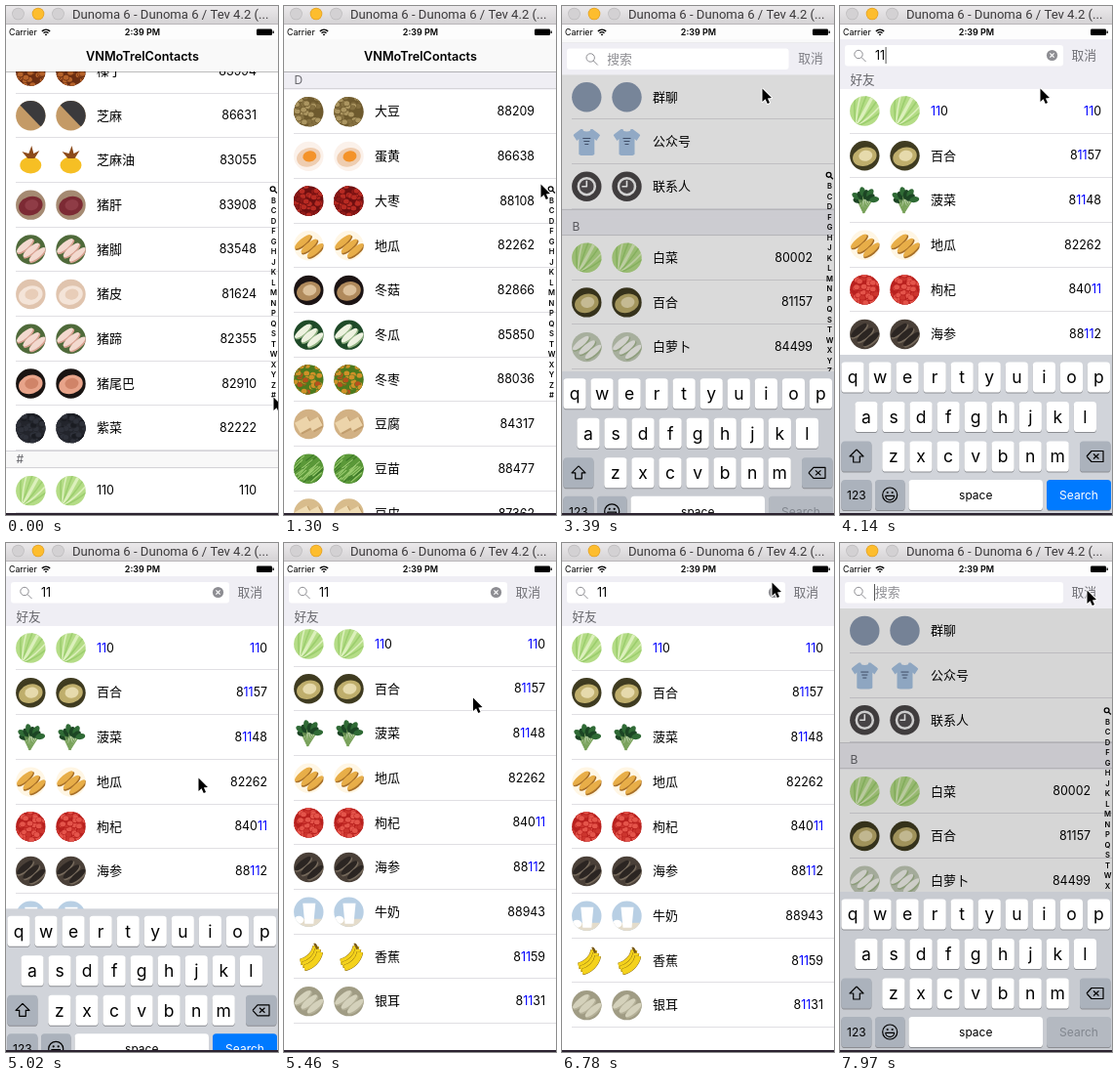
Animation of 279 by 521 pixels, one loop 8000 ms. Source, as an HTML page with a canvas:

```html
<!DOCTYPE html>
<html lang="zh">
<head>
<meta charset="utf-8">
<title>Contacts</title>
<style>
html, body { margin: 0; width: 100%; height: 100%; overflow: hidden; background: #fff; }
canvas { display: block; width: 279px; height: 521px; }
</style>
</head>
<body>
<canvas id="stage"></canvas>
<script>
const W = 279, H = 521, LOOP = 8000;
const ROW = 45.7, HEAD = 18.3, BAR = 33, TOP = 67, END = 519;
const FONT = 'Inter, "Noto Sans CJK SC", "Noto Sans CJK", sans-serif';
const TITLE = 'Roboto, sans-serif';
const GRAY = '#efeef4', LINE = '#e0dfe3';

const canvas = document.getElementById('stage');
const dpr = window.devicePixelRatio || 1;
canvas.width = Math.round(W * dpr);
canvas.height = Math.round(H * dpr);
const g = canvas.getContext('2d');
g.scale(dpr, dpr);

// name, number, picture kind, colours
const DATA = `
>
群聊 - o 8b9bb3
公众号 - t fff a9c6e6 4a5a78
联系人 - c 4b4749
>B
白菜 80002 v b4dc86 dcf0bc 9cce6e
百合 81157 e 3f3b20 bfae6c e6daac
白萝卜 84499 r c3ccb8 f4f4ee a5b890
扁豆 86588 g 55803f 8bb060 36565a
菠菜 81148 p fff 2f6a35 1c4524
菠萝 87968 a fff f0a020 3b7a2b
>C
草莓 85203 d b8202a e04848 7c1016
橙子 83746 e f4d9a0 f29a1e f8bf50
蚕豆 86920 d 6f9a3a a4c864 4d7426
>D
大豆 88209 d 6e5a2e ab9560 857040
蛋黄 86638 e fbf1ea efcdb0 f4932a
大枣 88108 d 6e0f10 b82a22 8c1816
地瓜 82262 r fff6e4 e8ae48 a87028
冬菇 82866 e 1c1414 b08a5c dcc09a
冬瓜 85850 r 1f4a28 eef2e0 8fb080
冬枣 88036 d 4d7a1e d09028 b8501c
豆腐 84317 k d2b184 ecd4aa c09c6c
豆苗 88477 g 5a9838 9ccc70 3d7a28
豆皮 87362 k d8bc8c efdcb4 c09c68
>G
枸杞 84011 d b8201e e4544a cc352e
桂圆 86054 d 9a7444 c8a06a 5e4424
>H
海参 88112 r 4a4038 2b2522 766a5c
核桃 87340 d a87c4c d0a878 6c4a28
花生 83629 d c89a60 e6c490 96683a
>L
莲藕 86275 e c8b49a f2e6d8 d6c0aa
辣椒 82037 r e8efe0 c8281c 3c7a2c
>N
牛奶 88943 m b8cfe4 fff e4dccb
南瓜 85366 e 8c4a10 ec8a20 f6b050
>T
土豆 84582 d c4a060 dcc088 987438
桃子 87204 e e8f0d8 f0989a f8c8b8
>X
香蕉 81159 b fff f4d21c 7a5a14
西瓜 83470 e 3a7a30 e8484c f07a78
>Y
银耳 81131 r a09c84 d4d1bb b4b098
玉米 86703 g 7aa040 f4cc3c c89820
>Z
榛子 83994 d 6b2e12 b5622a 8e4a1e
芝麻 86631 h c49a66 3b3a3c
芝麻油 83055 a fff f6bf24 8c4a1a
猪肝 83908 e a58a72 7c2a34 8f3c46
猪脚 83548 r 4f6a3a f3d9cf d8a090
猪皮 81624 e e0c4ae f4e4d8 e8cdb8
猪蹄 82355 r 4f6a3a f3d9cf d8a090
猪尾巴 82910 e 1a1412 e8a48a d08468
紫菜 82222 d 23252c 2e313a 1a1c22
>#
110 110 v b4dc86 dcf0bc 9cce6e`;

const blocks = [], items = [], sectionY = {};
let total = BAR;
for (const line of DATA.trim().split('\n')) {
  if (line[0] === '>') {
    const key = line.slice(1);
    if (!key) continue;
    if (key === 'B') { blocks.push({ y: total, h: 9, gap: true }); total += 9; }
    sectionY[key] = total;
    blocks.push({ y: total, h: HEAD, key });
    total += HEAD;
  } else {
    const [name, num, kind, ...cols] = line.split(' ');
    const item = { name, num: num === '-' ? '' : num, kind, cols: cols.map(c => '#' + c) };
    if (item.num) items.push(item);
    blocks.push({ y: total, h: ROW, item });
    total += ROW;
  }
}
items.unshift(items.pop());
const ALSO = ['地瓜', '牛奶'];   // found by other fields than the visible ones

// ---- helpers ----
const clamp = v => Math.max(0, Math.min(1, v));
const ease = v => { v = clamp(v); return v * v * (3 - 2 * v); };
const lerp = (a, b, p) => a + (b - a) * p;

function track(keys, t) {
  for (let i = 1; i < keys.length; i++) {
    const a = keys[i - 1], b = keys[i];
    if (t < b[0]) {
      const p = ease((t - a[0]) / (b[0] - a[0]));
      return a.slice(1).map((v, n) => lerp(v, b[n + 1], p));
    }
  }
  return keys[keys.length - 1].slice(1);
}
function rect(x, y, w, h, c) { g.fillStyle = c; g.fillRect(x, y, w, h); }
function round(x, y, w, h, r, c) {
  g.beginPath(); g.roundRect(x, y, w, h, r); g.fillStyle = c; g.fill();
}
function oval(x, y, rx, ry, a, c) {
  g.beginPath(); g.ellipse(x, y, rx, ry, a, 0, 7); g.fillStyle = c; g.fill();
}
const disc = (x, y, r, c) => oval(x, y, r, r, 0, c);
function poly(pts, c) {
  g.beginPath();
  pts.forEach(p => g.lineTo(p[0], p[1]));
  g.closePath();
  g.fillStyle = c; g.fill();
}
function stroke(c, w, pts) {
  g.strokeStyle = c; g.lineWidth = w;
  if (pts) { g.beginPath(); pts.forEach(p => g.lineTo(p[0], p[1])); }
  g.stroke();
}
function text(s, x, y, size, color = '#000', align = 'left', weight = 400, family = FONT) {
  g.font = `${weight} ${size}px ${family}`;
  g.textAlign = align;
  g.fillStyle = color;
  g.fillText(s, x, y + size * 0.36);
}
function marked(s, x, y, q, right) {
  const size = /\d/.test(s) ? 12.4 : 13;
  g.font = `400 ${size}px ${FONT}`;
  if (right) x -= g.measureText(s).width;
  const at = q ? s.indexOf(q) : -1;
  const parts = at < 0 ? [s] : [s.slice(0, at), q, s.slice(at + q.length)];
  parts.forEach((part, i) => {
    text(part, x, y, size, i === 1 ? '#00f' : '#000');
    x += g.measureText(part).width;
  });
}
function lens(x, y, r, c, w) {
  g.beginPath(); g.arc(x, y, r, 0, 7); stroke(c, w);
  stroke(c, w, [[x + r * .7, y + r * .7], [x + r * 1.8, y + r * 1.8]]);
}

// ---- row pictures ----
const art = {
  o() {},
  t(a, b, c) {
    poly([[-6, -13], [6, -13], [14, -7], [10, -1], [8, -3], [8, 14], [-8, 14], [-8, -3], [-10, -1], [-14, -7]], b);
    oval(0, -13, 4, 2.5, 0, '#fff');
    for (let i = 0; i < 3; i++) rect(-4 + i, -4 + i * 3, 8 - 2 * i, 1, c);
  },
  c() {
    g.beginPath(); g.arc(0, 0, 8.5, 0, 7);
    g.fillStyle = '#555153'; g.fill(); stroke('#f4f4f4', 2.5);
    stroke('#fff', 1.6, [[0, -6], [0, 0], [-5, 0]]);
  },
  d(a, b, c, rnd) {
    for (let i = 0; i < 48; i++) {
      const x = rnd() * 30 - 15, y = rnd() * 30 - 15;
      oval(x, y, 3.4, 3, 0, a);
      oval(x, y - .4, 2.9, 2.5, 0, i % 3 ? b : c);
    }
  },
  v(a, b, c) {
    g.rotate(.5);
    for (let i = -3; i <= 3; i++) {
      g.beginPath(); g.moveTo(0, 18); g.quadraticCurveTo(i * 4, 4, i * 6, -15);
      stroke(i % 2 ? c : b, i ? 1.6 : 3.2);
    }
  },
  g(a, b, c, rnd) {
    for (let i = 0; i < 30; i++) {
      const x = rnd() * 30 - 20, y = rnd() * 30 - 10;
      stroke(i % 2 ? b : c, 1.1, [[x, y], [x + 11, y - 7 - rnd() * 5]]);
    }
  },
  r(a, b, c) {
    g.rotate(-.7);
    for (let i = -1; i <= 1; i++) {
      oval(i * 2, i * 7.5 + 2, 11, 3.6, 0, c);
      oval(i * 2, i * 7.5 + .6, 10.5, 3.3, 0, b);
    }
  },
  k(a, b, c) {
    g.rotate(-.5);
    rect(-11, -7, 14, 13, c); rect(-12, -8, 14, 12, b);
    rect(1, -1, 12, 11, c); rect(0, -2, 12, 10, b);
  },
  m(a, b, c) {
    rect(-16, 7, 32, 10, c);
    poly([[-6, -9], [7, -9], [5, 12], [-4, 12]], b);
    oval(-10, 8, 5, 4, 0, b);
  },
  e(a, b, c) { oval(0, 1, 12.5, 9.5, -.3, b); oval(1, 0, 7, 5.5, -.2, c); },
  h(a, b) { poly([[-13, -13], [0, -18], [18, -18], [18, 11], [10, 11]], b); },
  a(a, b, c) {
    oval(0, 5, 11, 8.5, 0, b);
    poly([[-3, -2], [-9, -9], [-2, -7], [1, -15], [3, -7], [9, -10], [4, -2]], c);
  },
  p(a, b, c) {
    for (let i = 0; i < 8; i++) {
      const an = 3.3 + i * .4, far = i % 2 ? 10 : 7;
      stroke('#7aa35c', 1.4, [[-1, 13], [Math.cos(an) * 7, 2 + Math.sin(an) * 7]]);
      oval(Math.cos(an) * far, 1 + Math.sin(an) * far, 5, 3, an, i % 2 ? b : c);
    }
  },
  b(a, b, c) {
    for (let i = 0; i < 3; i++) {
      g.beginPath(); g.arc(-13 + i * 2, -15 + i * 3, 21, .2, 1.35);
      stroke(c, 6.6); stroke(b, 5.8);
    }
    stroke(c, 2.5, [[6, -14], [9, -8]]);
  }
};
function picture(item, x, y) {
  let seed = [...item.name].reduce((n, c) => n * 31 + c.charCodeAt(0), 7) % 2147483647;
  const rnd = () => (seed = seed * 16807 % 2147483647) / 2147483647;
  const [a, b, c] = item.cols;
  g.save();
  g.translate(x, y);
  g.beginPath(); g.arc(0, 0, 15.2, 0, 7);
  g.fillStyle = a; g.fill(); g.clip();
  art[item.kind](a, b, c, rnd);
  g.restore();
}
function row(item, y, right, q) {
  const cy = y + ROW / 2;
  picture(item, 25.3, cy);
  picture(item, 66.5, cy);
  marked(item.name, 93, cy - .4, q);
  marked(item.num, right, cy - .4, q, true);
  rect(10, Math.floor(y + ROW - .35), W - 10, 1, LINE);
}

// ---- screen parts ----
function list(top) {
  for (const b of blocks) {
    const y = top + b.y;
    if (y > H || y + b.h < 30) continue;
    if (b.item) row(b.item, y, 257, '');
    else {
      rect(0, y, W, b.h + .4, b.key === '#' ? '#f8f8f8' : GRAY);
      if (b.key) {
        text(b.key, 10.5, y + 8.7, 12, '#66666b');
        rect(0, Math.round(y + b.h) - 1, W, 1, '#d4d3d8');
      }
      if (b.gap || b.key === '#') rect(0, Math.round(y), W, 1, '#d4d3d8');
    }
  }
}
function indexBar(y) {
  lens(273.6, y - .8, 2.4, '#000', 1.3);
  [...'BCDFGHJKLMNPQSTWXYZ#'].forEach((c, i) =>
    text(c, 274.5, y + 11 + i * 10.5, 7.6, '#000', 'center', 600));
}
function searchBar(y, p, q, caret) {
  const cy = y + 16.5;
  rect(0, y, W, BAR, GRAY);
  round(5, y + 6, lerp(258, 224, p), 21.5, 3, '#fff');
  lens(lerp(117, 19, p), cy - 1, 4.2, '#8e8e93', 1);
  if (q) {
    text(q, 36, cy - .4, 12.4);
    if (caret) rect(36.5 + g.measureText(q).width, y + 8, 1, 17, '#555');
    disc(217.5, cy, 5.6, '#8e8e93');
    stroke('#fff', 1.2, [[215.4, cy - 2.1], [219.6, cy + 2.1]]);
    stroke('#fff', 1.2, [[219.6, cy - 2.1], [215.4, cy + 2.1]]);
  } else {
    text('搜索', lerp(133.5, 36, p), cy, 12.8, '#8e8e93');
    if (caret) rect(35, y + 8, 1, 17, '#555');
  }
  g.globalAlpha = p;
  text('取消', lerp(283, 237.5, p), cy - .4, 12.8, '#707076');
  g.globalAlpha = 1;
}
function statusBar() {
  rect(0, 19, W, 15, '#fdfdfd');
  text('Carrier', 3, 27, 8.8);
  text('2:39 PM', 140, 27, 9, '#000', 'center', 600);
  for (let i = 0; i < 3; i++) {
    g.beginPath(); g.arc(41, 30.5, 1.2 + i * 2.5, -2.3, -.84); stroke('#000', 1.4);
  }
  round(257, 23.5, 16, 6.5, 1.2, '#000');
  rect(273.5, 25.5, 1.3, 2.5, '#000');
}
function chrome() {
  const grad = g.createLinearGradient(0, 0, 0, 19);
  grad.addColorStop(0, '#ebe9eb');
  grad.addColorStop(1, '#d4d2d4');
  rect(0, 0, W, 19, grad);
  rect(0, 18, W, 1, '#b9b7b9');
  [[12.5, '#d3d1d3', '#bdbbbd'], [33, '#fdbd2e', '#e0a028'], [53.5, '#d3d1d3', '#bdbbbd']].forEach(([x, c, edge]) => {
    disc(x, 8, 6.3, edge);
    disc(x, 8, 5.6, c);
  });
  text('Dunoma 6 - Dunoma 6 / Tev 4.2 (...', 68, 8, 13.1, '#3c3a3c', 'left', 400, TITLE);
  rect(0, END, W, 2, '#2c2330');
}
function key(x, y, w, c, label, size, color = '#000') {
  round(x, y + 1, w, 31, 3.6, '#8b8d92');
  round(x, y, w, 31, 3.6, c);
  if (label) text(label, x + w / 2, y + 15.5, size, color, 'center');
}
function keyboard(y, active) {
  const dark = '#abb2bc';
  rect(0, y, W, END - 357, active ? '#d1d4da' : '#c8cbd1');
  ['qwertyuiop', 'asdfghjkl', 'zxcvbnm'].forEach((keys, r) =>
    [...keys].forEach((c, i) =>
      key([1.4, 15.4, 43.3][r] + i * 28.05, y + 7.5 + r * 40.5, 23.2, '#fff', c, 17.5)));
  const y3 = y + 88.5, y4 = y + 128;
  key(1.4, y3, 31, dark);
  key(246, y3, 31.5, dark);
  key(1.4, y4, 31, dark, '123', 12);
  key(36, y4, 30.5, dark);
  key(70.5, y4, 137.5, '#fff', 'space', 12);
  key(212, y4, 66, active ? '#007aff' : '#b4b9c1', 'Search', 12, active ? '#fff' : '#81868e');
  g.lineJoin = 'round';
  const cy = y3 + 15.5;
  stroke('#000', 1.2, [[17, cy - 7], [24, cy], [20.3, cy], [20.3, cy + 6], [13.7, cy + 6], [13.7, cy], [10, cy], [17, cy - 7]]);
  stroke('#000', 1.2, [[253, cy], [258, cy - 5.5], [270, cy - 5.5], [270, cy + 5.5], [258, cy + 5.5], [253, cy]]);
  stroke('#000', 1.2, [[260, cy - 2.5], [265.5, cy + 2.5]]);
  stroke('#000', 1.2, [[265.5, cy - 2.5], [260, cy + 2.5]]);
  const ey = y4 + 15.5;
  g.beginPath(); g.arc(51.2, ey, 7.5, 0, 7); stroke('#000', 1.2);
  disc(48.7, ey - 2.5, 1.1, '#000');
  disc(53.7, ey - 2.5, 1.1, '#000');
  g.beginPath(); g.arc(51.2, ey + .8, 4.4, 0, Math.PI); g.closePath(); stroke('#000', 1.2);
}
function pointer(x, y) {
  g.save();
  g.translate(x, y);
  g.lineJoin = 'round';
  const pts = [[.5, .5], [.5, 14], [3.6, 11.2], [5.8, 16], [8, 15], [5.9, 10.4], [10, 10]];
  stroke('#fff', 2, [...pts, pts[0]]);
  poly(pts, '#000');
  g.restore();
}

// ---- scenes ----
function mainScene(top, p, kb, caret) {
  const nav = TOP - BAR * p;
  list(top);
  indexBar(188 - 16 * p);
  rect(0, nav, W, H - nav, `rgba(0,0,0,${.16 * p})`);
  searchBar(top, p, '', caret);
  rect(0, 19, W, nav - 19, '#f9f9f9');
  rect(0, Math.round(nav), W, 1, `rgba(0,0,0,${.26 * (1 - p)})`);
  g.globalAlpha = 1 - p;
  text('VNMoTrelContacts', 140, 51 - BAR * p, 12.7, '#000', 'center', 600);
  g.globalAlpha = 1;
  if (kb > 0) keyboard(END - 162 * kb, false);
}
function resultScene(q, off, kb) {
  const head = 66 + Math.max(0, off);
  items.filter(it => it.num.includes(q) || ALSO.includes(it.name))
    .forEach((it, i) => row(it, 84.7 + off + i * ROW, 268, q));
  rect(0, 19, W, head, GRAY);
  text('好友', 10.5, head + 9.3, 12.6, '#66666b');
  searchBar(34, 1, q, kb === 1);
  if (kb > 0) keyboard(END - 162 * kb, true);
}

const STEPS = [0];
[[150, 150, 1], [450, 450, 1], [750, 1300, 5], [1450, 1750, 3], [2200, 2800, 5], [3090, 3540, 4],
 [3840, 4140, 2], [4440, 5460, 8], [5600, 6630, 8], [6780, 7080, 3], [7370, 7970, 5]].forEach(([a, b, n]) => {
  for (let i = 0; i < n; i++) STEPS.push(a + (n > 1 ? (b - a) * i / (n - 1) : 0));
});
const POINTER = [[0, 274, 400], [150, 275, 400], [450, 274, 401], [650, 274, 400], [1300, 263, 182],
  [1450, 267, 186], [2050, 268, 187], [2800, 205, 84], [4300, 205, 84], [4870, 197, 240],
  [5300, 193.5, 158], [5600, 193.5, 158], [6040, 199, 205], [6480, 214, 4], [6780, 215, 40],
  [7080, 217, 46], [7400, 217, 47], [7970, 253, 48]];
const SCROLL = [[4870, 0], [5160, -30], [5460, -4], [5600, -3], [6040, 21], [6340, 12], [6630, 1], [6780, 0]];
const JUMPS = [[750, 'X'], [880, 'T'], [1020, 'N'], [1160, 'H'], [1300, 'D'], [1450, 'C'], [1600, 'B']];

function mainTop(t) {
  if (t >= 1750) return TOP;
  let top = END - total;
  for (const [at, k] of JUMPS) if (t >= at) top = Math.max(END - total, TOP - sectionY[k]);
  return top;
}
function draw(t) {
  rect(0, 0, W, H, '#fff');
  if (t < 3840) {
    const p = ease((t - 2990) / 500);
    mainScene(mainTop(t) - BAR * p, p, p, t >= 3540);
  } else if (t < 7370) {
    resultScene(t < 4140 ? '1' : '11', track(SCROLL, Math.max(t, 4870))[0], 1 - ease((t - 4800) / 380));
  } else mainScene(TOP - BAR, 1, ease((t - 7250) / 400), true);
  statusBar();
  chrome();
  pointer(...track(POINTER, t));
}

let shown = -1;
const start = performance.now();
function tick() {
  const t = (performance.now() - start) % LOOP;
  let step = 0;
  for (const s of STEPS) if (s <= t + 1) step = s;
  if (step !== shown) draw(shown = step);
  requestAnimationFrame(tick);
}
tick();
</script>
</body>
</html>
```
